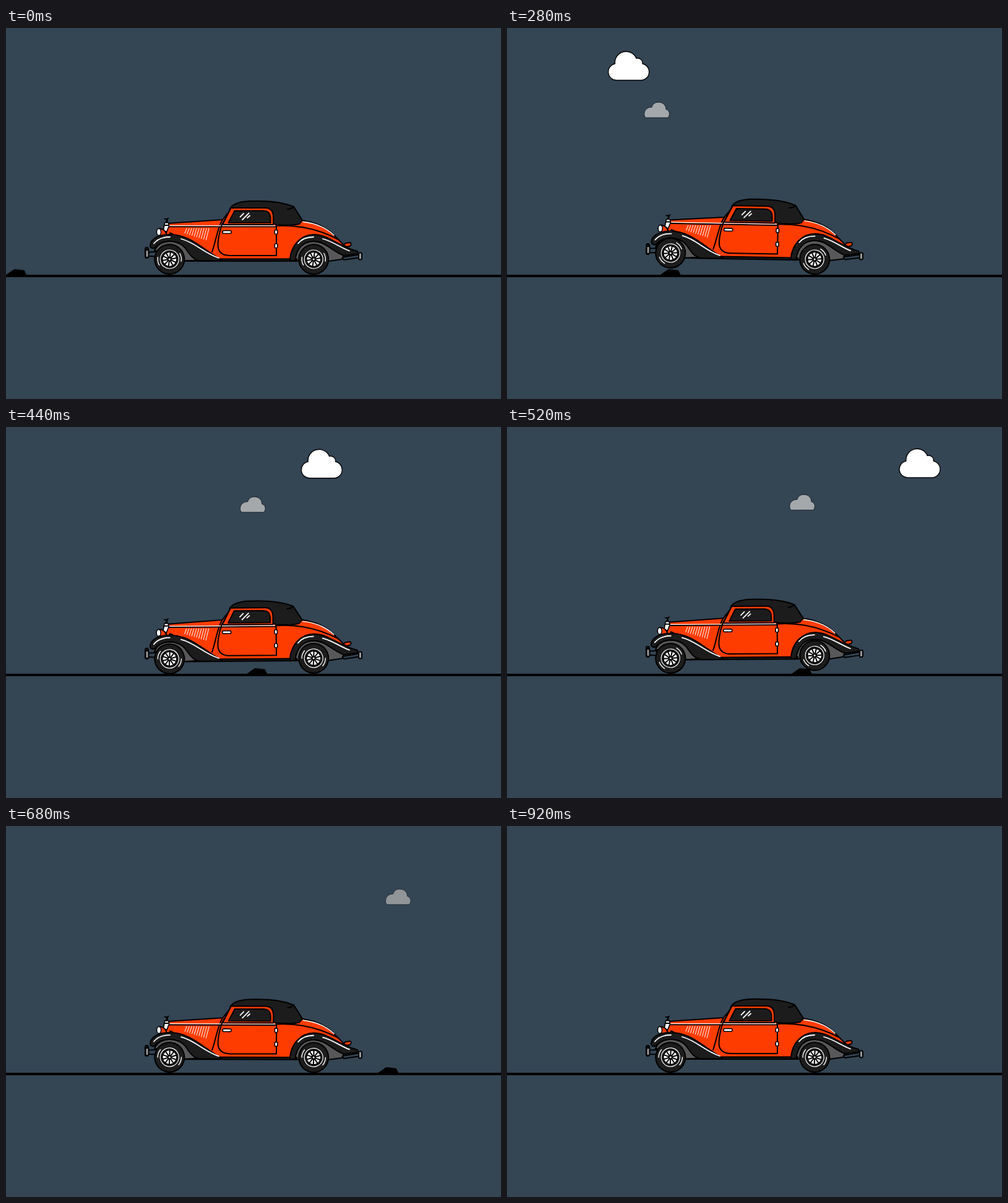
Animation, 800 px wide and 600 px high, one loop 960 ms. Source, as an HTML page:

```html
<!DOCTYPE html>
<html lang="en">
<head>
<meta charset="utf-8">
<title>Roadster</title>
<style>
  html, body { margin: 0; width: 100%; height: 100%; overflow: hidden; background: #344554; }
  svg { display: block; width: 800px; height: 600px; }
  .car { stroke: #000; stroke-width: 2; stroke-linejoin: round; stroke-linecap: round; }
  .red { fill: #ff3c00; }
  .dark { fill: #1c1c1c; }
  .grey { fill: #58585a; }
  .chrome { fill: #fff; stroke-width: 1.6; }
  .line { fill: none; }
  .shine { fill: none; stroke: #fff; stroke-width: 1.8; }
</style>
</head>
<body>
<svg viewBox="0 0 800 600">
  <defs>
    <g id="wheel">
      <circle r="24" fill="#1c1c1c" stroke="#000" stroke-width="2"/>
      <circle r="15" fill="#111" stroke="#fff" stroke-width="1.2"/>
      <circle r="11" fill="#fff"/>
      <g id="spokes" stroke="#000" stroke-width="2"></g>
      <circle r="11.5" fill="none" stroke="#000" stroke-width="1.2"/>
      <circle r="3.6"/>
      <circle r="1.5" fill="#fff"/>
      <g fill="none" stroke="#fff" stroke-width="1.4" stroke-linecap="round">
        <path id="mark" d="M18 -6.5A19.2 19.2 0 0 1 18 6.5"/>
        <use href="#mark" transform="rotate(180)"/>
      </g>
    </g>
  </defs>

  <path id="small" stroke="#17212a" d="M107 150.500C104.500 148.500 104 146 104.500 143C105 137 111 133 116.500 133.500C118 128 122 125.500 127.500 125.500C134 125.500 139.500 130 139.500 137C143 138 145 141 145 144C145 147 144 149.500 142 150.500Z"/>
  <path id="big" fill="#fff" stroke="#000" stroke-width="1.4" d="M178 84.500A13.500 13.500 0 0 1 174.500 57.800A18 18 0 0 1 209 49A8 8 0 0 1 219 57.800A13.500 13.500 0 0 1 216.500 84.500Z"/>

  <rect y="399" width="800" height="4"/>
  <path id="rock" d="M-1 400L12.500 390.500L14.500 390L29.500 391.800L33 399V400Z"/>

  <g id="body" class="car">
    <!-- bumpers -->
    <path class="line" d="M231 362.500L242 362M231 369L242 369.500"/>
    <rect class="dark" x="225" y="355" width="5" height="17" rx="2.500"/>
    <rect x="225.500" y="359" width="5" height="12" rx="2" fill="#99999b"/>
    <path d="M543 371L570 366.500V371.500L546 375Z" fill="#344554"/>
    <rect x="570" y="363.500" width="5" height="11" rx="2" fill="#99999b"/>

    <!-- shell -->
    <path class="red" d="M262 316L350 310L366 290H420L436 318L478 311C504 315 522 325 533 338L553 358L520 375H285L258 336Z"/>
    <path class="grey" d="M240 360C245 349 253 345 264 345C281 345 290 354 297 364L316 376.500H285L264 362Z"/>
    <path class="grey" d="M467 376.500C468 356 480 345 497 345C514 345 526 358 546 367L543 374L522 377Z"/>
    <path class="dark" d="M335 373.500H470V377H288Z"/>

    <!-- bonnet -->
    <path class="line" d="M350 310C342 322 340 342 333 362"/>
    <path class="line" d="M264 321.300H436"/>
    <path class="shine" stroke-linecap="butt" style="stroke-width:1.300" d="M264 319.600L435 319.800"/>
    <g id="vents" stroke="#fff" stroke-width="1"></g>

    <!-- radiator, mascot and lamp -->
    <path class="chrome" d="M256.500 315H262.500L263.500 320L260 329H254Z"/>
    <path class="line" d="M256 319H263"/>
    <path d="M258 314L260 310.500L255.500 308.500L260 308.500L263 307L261 310L261 314Z" stroke-width="1"/>
    <path class="red" d="M248 324.500C255 325 258.500 329 259.500 334L256 336L248 335.500Z"/>
    <ellipse class="chrome" cx="247" cy="330" rx="3.500" ry="5.500"/>
    <path class="line" d="M265 336V331.500L269 333L271 336"/>

    <!-- roof and window -->
    <path class="dark" d="M362 292C366 285 376 281 392 280C420 279 446 281 465 289L479 311L474 317C462 320 448 319 436 318L429 314L420 293Z"/>
    <path class="line" d="M465 289C462 292 459 293 455 293"/>
    <path class="red" d="M363.500 291H419C428 291 432 296 432 306V318H350Z"/>
    <path class="dark" d="M369.500 295.500H415C423.500 295.500 427 299 427.500 307V315H359.500Z"/>
    <path class="shine" d="M378.500 305.500L384 300M382 310L392.500 299.500M390 307L394 303.500"/>

    <!-- door -->
    <path class="line" d="M363 292L349 318C344 332 341.500 348 343 356C345 364 352 368 362 368H437V319"/>
    <rect class="chrome" x="350" y="327.800" width="14" height="4.400" rx="2"/>
    <rect class="chrome" x="434.300" y="326.500" width="4.400" height="7" rx="2"/>
    <rect class="chrome" x="434.300" y="348.800" width="4.400" height="7" rx="2"/>

    <!-- tail -->
    <path class="line" d="M437 320C470 318 505 325 537 342"/>
    <path class="shine" style="stroke-width:1.400" d="M480 313.500C500 315.500 517 323 530 335"/>
    <path class="red" d="M545 351L549 348L556 347C558.500 348 558 351 556 352.500L551 354Z"/>

    <!-- fenders -->
    <path class="dark" d="M233 352C234 340 248 334 264 334C292 334 310 350 328 362C335 367 341 371 350 376.500H314C302 375 297 366 292 359C285 348 273 344 262 345C252 346 246 349 240 356C236 357 233 355 233 352Z"/>
    <path class="shine" d="M239 348.500C245 341 254 338 265 338M283 341C306 347 318 363 344 372"/>
    <path class="dark" d="M459 373C461 352 476 334 498 334C521 334 537 353 568 361L569 365L546 368C527 361 516 345 498 345C481 345 470 356 467 376.500H459Z"/>
    <path class="shine" d="M472 348.500C478 341 486 338 497 338M512 341C528 345 540 355 555 360.500"/>
  </g>

  <use id="front" href="#wheel"/>
  <use id="rear" href="#wheel"/>
</svg>
<script>
  const LOOP = 960, STEP = 40, SPEED = 0.884;
  const FRONT_HIT = 280, REAR_HIT = 544;
  const el = id => document.getElementById(id);
  const set = (id, name, value) => el(id).setAttribute(name, value);
  const lines = (n, fn) => Array.from({ length: n }, (_, i) => `<path d="${fn(i)}"/>`).join("");

  el("spokes").innerHTML = lines(10, i => {
    const a = i * Math.PI / 5;
    return `M0 0L${11.5 * Math.cos(a)} ${11.5 * Math.sin(a)}`;
  });
  el("vents").innerHTML = lines(10, i =>
    `M${292 + 4 * i} 324L${289 + 3.8 * i} ${332 + 1.2 * i}`);

  const clamp = x => Math.min(1, Math.max(0, x));

  // Eased value along [time, value] keys
  function track(keys, t) {
    let v = keys[0][1];
    for (let i = 1; i < keys.length; i++) {
      const [t0, a] = keys[i - 1], [t1, b] = keys[i];
      const k = clamp((t - t0) / (t1 - t0));
      v += (b - a) * k * k * (3 - 2 * k);
    }
    return v;
  }

  const TILT = [[-56, 0], [56, 2], [160, -0.5], [210, 0]];
  const LIFT = [[-45, 0], [0, 10], [90, 0]];

  const mix = (a, b, k) => a.map((v, i) => Math.round(v + (b[i] - v) * k));
  const PALE = [164, 168, 170], DIM = [108, 111, 113], SKY = [52, 69, 84];

  function wheel(id, x, hit, tilt, t) {
    const y = 374 - track(LIFT, t - hit) - 2 * Math.min(0, tilt);
    set(id, "transform", `translate(${x} ${y}) rotate(${-10 - 720 * t / LOOP})`);
  }

  function draw(t) {
    set("rock", "transform", `translate(${SPEED * t} 0)`);

    const s = t - 160;
    set("small", "transform", `translate(${0.979 * s} ${-0.045 * s})`);
    const fade = 2 * clamp((t - 640) / 240);
    const tone = fade < 1 ? mix(PALE, DIM, fade) : mix(DIM, SKY, fade - 1);
    set("small", "fill", `rgb(${tone})`);
    set("small", "stroke-opacity", 1 - fade / 2);

    const b = t - 280;
    set("big", "transform", `translate(${1.96 * b} ${-0.011 * b})`);

    const nose = track(TILT, t - FRONT_HIT), tail = track(TILT, t - REAR_HIT);
    set("body", "transform", `rotate(${nose} 575 369) rotate(${-tail} 228 364)`);
    wheel("front", 264.3, FRONT_HIT, nose, t);
    wheel("rear", 497.2, REAR_HIT, tail, t);
  }

  const start = performance.now();
  function tick(now) {
    const t = Math.max(0, now - start) + 2;
    draw(Math.floor(t / STEP) * STEP % LOOP);
    requestAnimationFrame(tick);
  }
  draw(0);
  requestAnimationFrame(tick);
</script>
</body>
</html>
```
